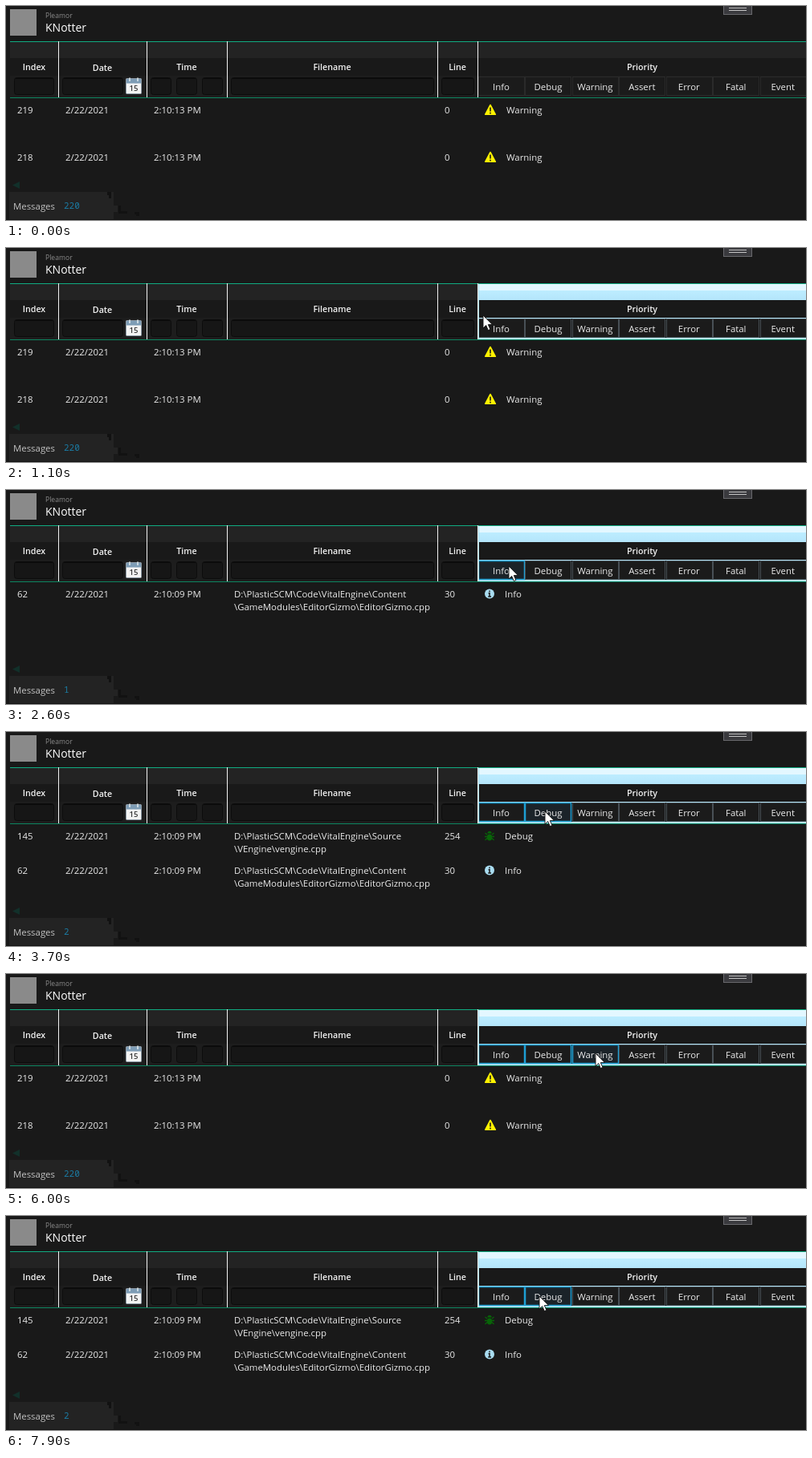
An HTML page that plays this animation: 996x267 px, repeating every 8000 ms.

```html
<!DOCTYPE html>
<html lang="en">
<head>
<meta charset="utf-8">
<title>Log viewer</title>
<style>
html, body { margin: 0; width: 100%; height: 100%; overflow: hidden; background: #191919; }
svg { display: block; width: 996px; height: 267px; }
text { font: 11.4px "Open Sans", "Noto Sans", sans-serif; fill: #ebebeb; white-space: pre; }
.head { font-size: 10.7px; font-weight: 600; fill: #f2f2f2; text-anchor: middle; }
.mid { text-anchor: middle; }
.count { font: 11px "Noto Sans Mono", "DejaVu Sans Mono", monospace; fill: #1b7ba3; }
.brand { font-size: 8.6px; fill: #8b8b8b; }
.title { font-size: 14px; fill: #fff; }
.day { font-size: 9.5px; font-weight: 600; fill: #333; text-anchor: middle; }
</style>
</head>
<body>
<svg id="stage" viewBox="0 0 996 267" xmlns="http://www.w3.org/2000/svg">
  <defs>
    <linearGradient id="glow" x2="0" y2="1">
      <stop offset="0" stop-color="#e3f7ff"/><stop offset=".4" stop-color="#e3f7ff"/>
      <stop offset=".4" stop-color="#bdedff"/><stop offset="1" stop-color="#b4e5fb"/>
    </linearGradient>
    <g id="Warning">
      <path d="M603 123.5L609.3 135.3H596.7Z" fill="#fff200" stroke="#fff200" stroke-width="1.6" stroke-linejoin="round"/>
      <path d="M603 126.5V131.5M603 132.8V134.4" stroke="#191919" stroke-width="1.6"/>
    </g>
    <g id="Info">
      <circle cx="602" cy="129.5" r="6" fill="#a9dcf0"/>
      <path d="M602 125.5V127.2M600.6 128.8H602V133M600.2 133H604" fill="none" stroke="#191919" stroke-width="1.5"/>
    </g>
    <g id="Debug" fill="#086408" stroke="#086408">
      <path d="M596.5 126L599 128M607.5 126L605 128M596 130.5H608M596.5 135L599 132.5M607.5 135L605 132.5" stroke-width="1.3"/>
      <rect x="599" y="127.5" width="6" height="8" rx="3" stroke="none"/>
      <path d="M599.4 126.5A2.6 2.8 0 0 1 604.6 126.5Z" stroke="none"/>
    </g>
  </defs>
  <rect width="996" height="267" fill="#191919"/>
  <rect x="5" y="4" width="33" height="33" fill="#8a8a8a"/>
  <text class="brand" x="49" y="15">Pleamor</text>
  <text class="title" x="49" y="32">KNotter</text>
  <rect x="893.5" y="-1" width="35" height="11.5" fill="#3a3a3e" stroke="#68686c"/>
  <path d="M900 2.5H922M900 5.5H922" stroke="#c4c4c4"/>

  <rect x="5" y="45" width="991" height="20" fill="#232323"/>
  <rect x="5" y="87" width="991" height="27" fill="#1d1d1d"/>
  <path d="M5 44.5H996" stroke="#10ac82"/>
  <path d="M5 114.5H996" stroke="#0c8560"/>
  <g id="hover"></g>
  <g id="inputs"></g>
  <g id="buttons"></g>
  <path d="M65.5 44V114M175.5 44V114M275.5 44V114M537.5 44V114M587.5 44V114" stroke="#f2f2f2"/>
  <g id="edge"></g>
  <g id="heads"></g>
  <g>
    <rect x="149.5" y="90.5" width="19" height="19" rx="1" fill="#f4f4f4" stroke="#8d9aa5"/>
    <rect x="150" y="91" width="18" height="5.5" fill="#7d9cb5"/>
    <path d="M154 89.5V94M164 89.5V94" stroke="#dde6ec" stroke-width="1.6"/>
    <text class="day" x="159" y="106">15</text>
  </g>
  <g id="rows"></g>

  <path d="M8 223.5L17 219V228Z" fill="#12302a"/>
  <path d="M4 232H134V249H139V257H134V266H4Z" fill="#232323"/>
  <path d="M126 232H131V240H128V236H126ZM140 249H143V256H151V259H140ZM160 257H166V262H162V260H160Z" fill="#121212"/>
  <path d="M0 266.5H996" stroke="#131313"/>
  <text x="9" y="254" fill-opacity=".8">Messages</text>
  <text id="count" class="count" x="72" y="253"></text>

  <path id="arrow" d="M0 0V16L3.7 12.5L6.3 18.6L8.9 17.5L6.3 11.6H11.4Z" fill="#fff" stroke="#111" stroke-width=".9"/>
  <path id="sizer" d="M-9 0L-5 -4V-1.5H-1.5V-5H-4L0 -9L4 -5H1.5V-1.5H5V-4L9 0L5 4V1.5H1.5V5H4L0 9L-4 5H-1.5V1.5H-5V4Z" fill="#fff" stroke="#111"/>
</svg>
<script>
const $ = id => document.getElementById(id);
const rect = (x, y, w, h, more) => `<rect x="${x}" y="${y}" width="${w}" height="${h}" ${more}/>`;
const label = (x, y, s, cls = '') => `<text class="${cls}" x="${x}" y="${y}">${s}</text>`;
const set = (id, html) => { if ($(id).shown !== html) $(id).innerHTML = $(id).shown = html; };

// name, left, right, heading centre
const cols = [
  ['Index', 5, 65, 35], ['Date', 66, 175, 120], ['Time', 176, 275, 225],
  ['Filename', 276, 537, 406], ['Line', 538, 587, 562], ['Priority', 588, 997, 792]
];
const levels = ['Info', 'Debug', 'Warning', 'Assert', 'Error', 'Fatal', 'Event'];
const pitch = 58.45;

$('heads').innerHTML = cols.map(([name, , , mid]) =>
  label(mid, name === 'Date' ? 81 : 80, name, 'head')).join('');
$('inputs').innerHTML = [[10, 60], [70, 146], [180, 206], [212, 238], [244, 270], [280, 533], [542, 583]]
  .map(([a, b]) => rect(a + .5, 89.5, b - a - 1, 21, 'rx="3" fill="#161616" stroke="#0c0c0c"') +
    `<path d="M${a + 2} 90.5H${b - 2}" stroke="#0a0a0a"/>`).join('');

const path = 'D:\\PlasticSCM\\Code\\VitalEngine\\';
const row = (y, id, time, line, kind, file = []) => {
  const at = y + 134;
  return label(14, at, id) + label(74, at, '2/22/2021') + label(184, at, time) +
    file.map((s, i) => label(284, at + i * 16, s)).join('') + label(546, at, line) +
    `<use href="#${kind}" y="${y}"/>` + label(kind === 'Warning' ? 623 : 621, at, kind);
};
const info = y => row(y, 62, '2:10:09 PM', 30, 'Info',
  [path + 'Content', '\\GameModules\\EditorGizmo\\EditorGizmo.cpp']);
const warn = (y, id) => row(y, id, '2:10:13 PM', 0, 'Warning');
const lists = {
  220: warn(0, 219) + warn(59, 218),
  1: info(0),
  2: row(0, 145, '2:10:09 PM', 254, 'Debug', [path + 'Source', '\\VEngine\\vengine.cpp']) + info(43)
};

// time, x, y of the pointer
const moves = [
  [300, 440, 2], [600, 503, 38], [900, 543, 58], [1000, 562, 68], [1100, 594, 84], [1300, 625, 95],
  [1600, 625, 95], [1700, 626, 95], [2600, 626, 95], [3300, 671, 99],
  [5200, 671, 99], [5700, 734, 99], [7400, 734, 99], [7900, 664, 100], [8000, 664, 100]
];
const within = (t, a, b) => t >= a && t < b;

function pointer(t) {
  const i = moves.findIndex(m => m[0] > t);
  const [t0, x0, y0] = moves[i - 1], [t1, x1, y1] = moves[i];
  let k = (t - t0) / (t1 - t0);
  if (t > 1700) k = k * k * (3 - 2 * k);
  return [x0 + (x1 - x0) * k, y0 + (y1 - y0) * k];
}

function render(t) {
  const seen = t >= 300;
  const [x, y] = seen ? pointer(t) : [-50, -50];
  const inHead = y > 44 && y < 114;
  const sizing = inHead && x > 531 && x < 547;
  const col = !inHead ? -1 : sizing ? 3 : cols.findIndex(c => x >= c[1] && x <= c[2]);

  let glow = '', edge = '';
  if (col >= 0) {
    const [, a, b] = cols[col];
    glow = rect(a, 45, b - a, 20, 'fill="url(#glow)"') + rect(a, 87, b - a, 27, 'fill="#b7e7fb"');
    edge = `<path d="M${a + .5} 45V114M${b - .5} 45V114" stroke="#a5dcf5"/>`;
  }
  set('hover', glow);
  set('edge', edge);

  const chosen = [t >= 1800, t >= 3700, within(t, 5900, 7500)];
  const pressed = [within(t, 1600, 1800), within(t, 3500, 3700),
    within(t, 5700, 5900) || within(t, 7300, 7500)];
  const live = col === 5;
  set('buttons', levels.map((name, i) => {
    const left = Math.round(588 + i * pitch);
    const over = live && y > 87 && x >= left && x < left + pitch;
    const fill = pressed[i] ? '#0678a0' : over ? '#1b2329' : '#1b1b1b';
    const line = chosen[i] ? '#1e9fd4' : live ? '#485056' : '#2a2a2a';
    return rect(left, 88, 59, 24, 'fill="#161616"') +
      rect(left + .5, 88.5, 57, 23, `fill="${fill}" stroke="${line}" stroke-width="${chosen[i] ? 1.5 : 1}"`) +
      label(616.5 + i * pitch, 105, name, 'mid');
  }).join(''));

  const total = t < 1800 || within(t, 5900, 7500) ? 220 : t < 3700 ? 1 : 2;
  set('rows', lists[total]);
  set('count', String(total));

  for (const [id, on] of [['arrow', seen && !sizing], ['sizer', sizing]]) {
    $(id).setAttribute('visibility', on ? 'visible' : 'hidden');
    $(id).setAttribute('transform', `translate(${Math.round(x)} ${Math.round(y)})`);
  }
}

const start = performance.now();
function tick() {
  const t = (performance.now() - start) % 8000;
  render(Math.floor(t / 100) * 100);
  requestAnimationFrame(tick);
}
tick();
</script>
</body>
</html>
```
